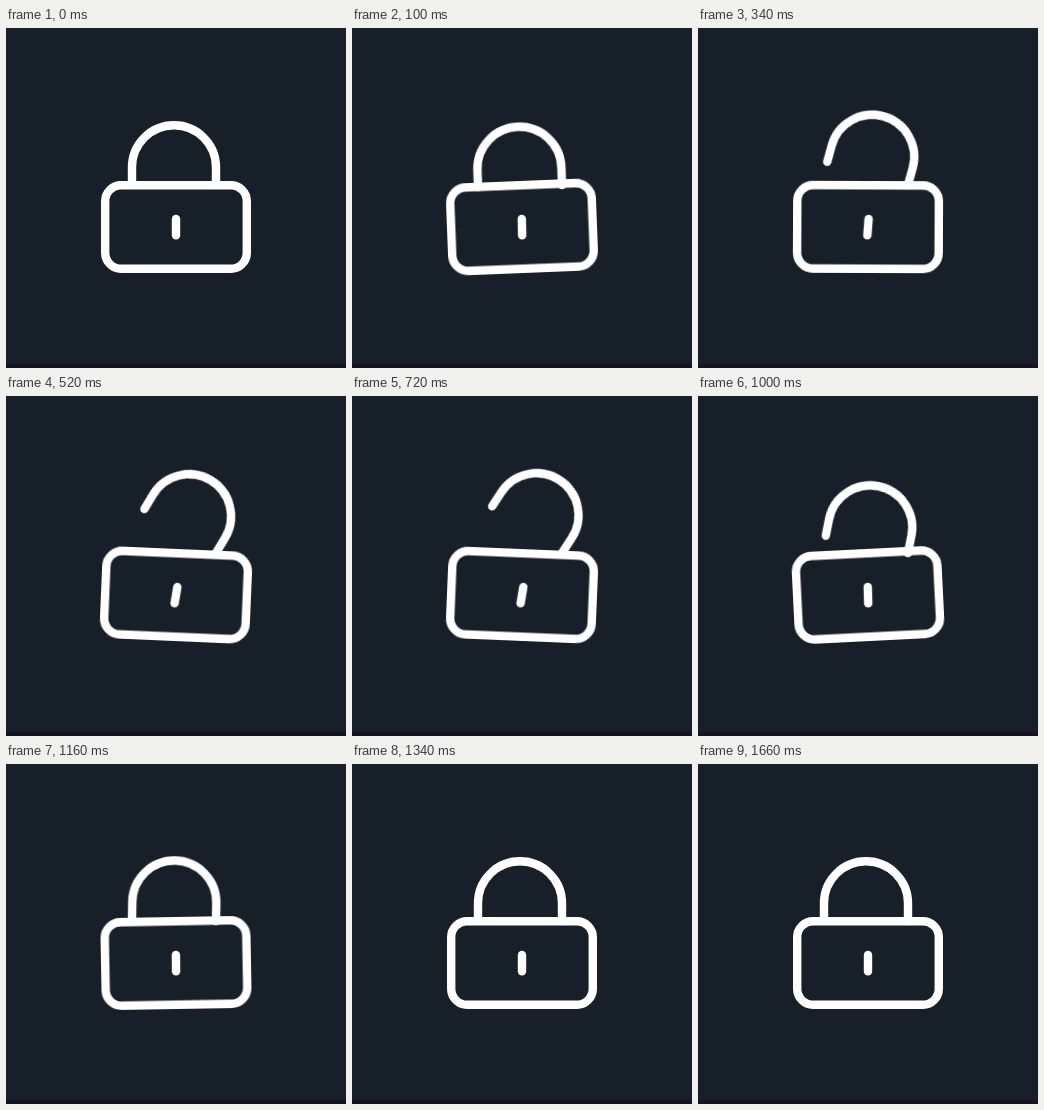
An HTML page for the animation above (1940 ms loop, 340 by 340 pixels).

```html
<!DOCTYPE html>
<html lang="en">
<head>
<meta charset="utf-8">
<title>Padlock</title>
<style>
  html, body {
    margin: 0;
    width: 100%;
    height: 100%;
    overflow: hidden;
    background: #171f28;
  }
  svg {
    display: block;
    width: 100%;
    height: 100%;
  }
  .lock {
    fill: none;
    stroke: #fff;
    stroke-width: 8.4;
    stroke-linecap: round;
  }
  .shackle, .body, .keyhole {
    animation: 1940ms cubic-bezier(.333, 0, .667, 1) infinite;
    transform-origin: 170px 199px;
  }
  .shackle {
    animation-name: swing;
    transform-origin: 210px 157px;
  }
  .body { animation-name: tilt; }
  .keyhole { animation-name: turn; }

  /* wind up at 60 ms, fully open at 640 ms, shut by about 1220 ms */
  @keyframes swing {
    0% { transform: rotate(0deg); }
    3.093% { transform: rotate(-2.5deg); }
    32.99% { transform: rotate(35deg); }
    62.887%, 100% { transform: rotate(0deg); }
  }
  @keyframes tilt {
    0% { transform: rotate(0deg); }
    3.093% { transform: rotate(-2.3deg); }
    32.99% { transform: rotate(3deg); }
    53.608% { transform: rotate(-3deg); }
    63.918%, 100% { transform: rotate(0deg); }
  }
  @keyframes turn {
    0% { transform: rotate(0deg); }
    3.093% { transform: rotate(-1.5deg); }
    32.99% { transform: rotate(11deg); }
    53.608% { transform: rotate(-2deg); }
    63.918%, 100% { transform: rotate(0deg); }
  }
</style>
</head>
<body>
<svg viewBox="0 0 340 340">
  <rect y="336.5" width="340" height="3.5" fill="#190f22"/>
  <g class="lock">
    <path class="shackle" d="M126 156V139.3a42 42 0 0 1 84 0V157"/>
    <rect class="body" x="99.2" y="157.2" width="141.6" height="83.6" rx="16"/>
    <path class="keyhole" d="M170 191V207.4"/>
  </g>
</svg>
</body>
</html>
```
